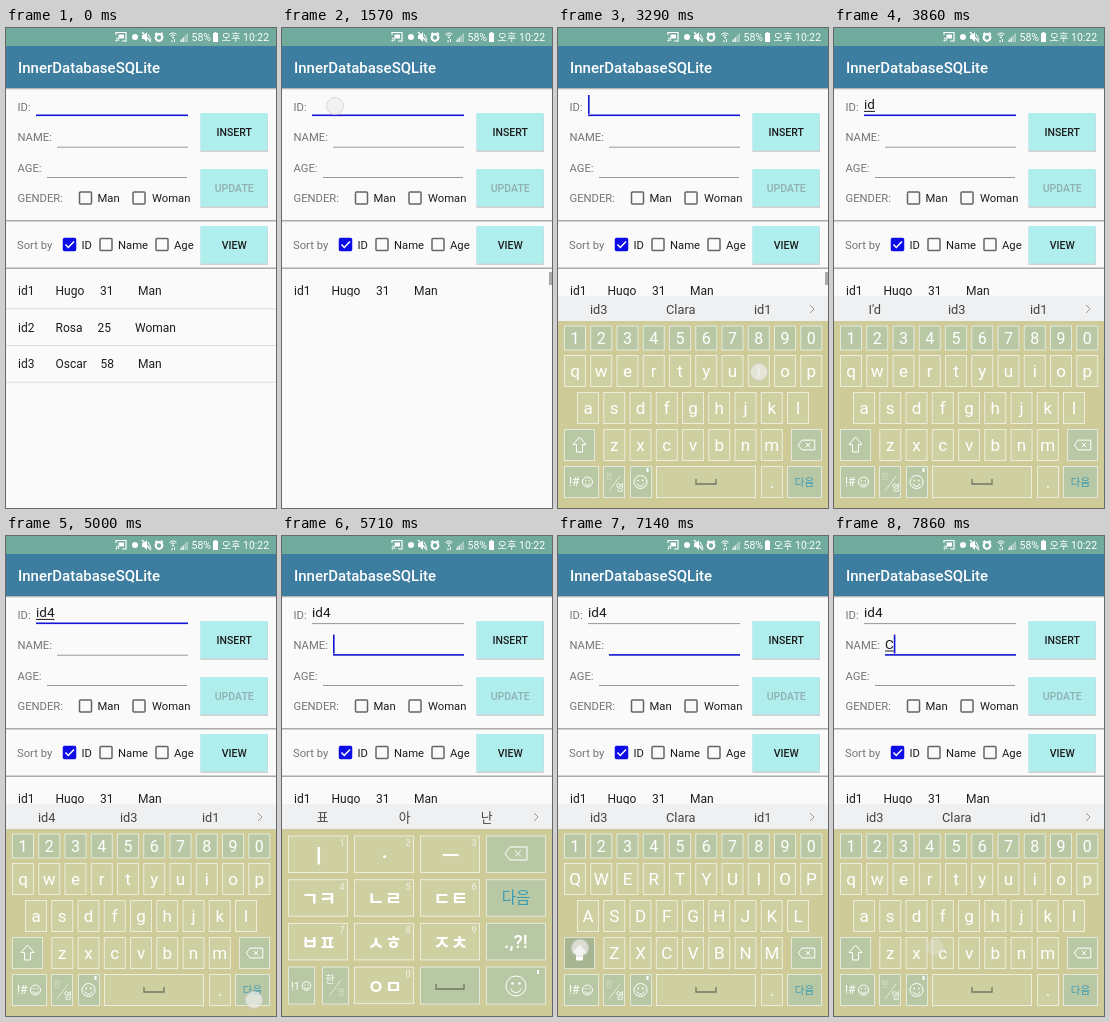
An HTML page with a canvas for the animation above (8000 ms loop, 270 px wide and 480 px high).

```html
<!DOCTYPE html>
<html lang="en">
<head>
<meta charset="utf-8">
<title>InnerDatabaseSQLite</title>
<style>
  html, body { margin: 0; width: 100%; height: 100%; overflow: hidden; background: #fafafa; }
  canvas { display: block; width: 270px; height: 480px; }
</style>
</head>
<body>
<canvas id="stage"></canvas>
<script>
const canvas = document.getElementById('stage');
const ctx = canvas.getContext('2d');
const dpr = window.devicePixelRatio || 1;
canvas.width = 270 * dpr;
canvas.height = 480 * dpr;

const LOOP = 8000, FPS = 7;
const BLUE = '#1414d2', WHITE = '#fff', GREY = '#757575', BLACK = '#1c1c1c';
const KEYBOARD = '#cecb98', PLAIN = '#cfd0a2', TINT = '#b9c8a4', NEXT = '#3b9bb5';

const PEOPLE = [
  ['Hugo', '31', 94, 'Man', 132],
  ['Rosa', '25', 91.5, 'Woman', 129],
  ['Oscar', '58', 94.5, 'Man', 132]
];

// Spans are in ticks of 1/7 s: [start, end)
const CURSOR_ON = [[3, 10], [14, 19], [23, 27], [29, 35], [37, 41], [44, 48], [52, 56]];
const TOUCHES = [
  [6, 13, 53, 78], [16, 19, 48, 462], [23, 25, 201, 344], [26, 27, 83, 381],
  [30, 33, 97, 311], [35, 39, 248, 464], [45, 48, 48, 462], [50, 52, 22, 412], [53, 56, 101, 411]
];
const within = (tick, [start, end]) => tick >= start && tick < end;

// Picks the value of the last step that has begun
const pick = (tick, steps) => steps.filter(([start]) => tick >= start).pop()[1];

function text(str, x, y, size, color, align = 'left', weight = 400) {
  ctx.font = `${weight} ${size}px Roboto, "Noto Sans CJK KR", sans-serif`;
  ctx.textAlign = align;
  ctx.fillStyle = color;
  ctx.fillText(str, x, y);
}

function box(x, y, w, h, color) {
  ctx.fillStyle = color;
  ctx.fillRect(x, y, w, h);
}

function line(points, color = WHITE, width = 1, close = false) {
  ctx.beginPath();
  points.forEach(([x, y]) => ctx.lineTo(x, y));
  if (close) ctx.closePath();
  ctx.strokeStyle = color;
  ctx.lineWidth = width;
  ctx.stroke();
}

function shape(points, color = WHITE) {
  ctx.beginPath();
  points.forEach(([x, y]) => ctx.lineTo(x, y));
  ctx.fillStyle = color;
  ctx.fill();
}

function arc(x, y, r, from = 0, to = 2 * Math.PI, width = 1, color = WHITE) {
  ctx.beginPath();
  ctx.arc(x, y, r, from, to);
  ctx.strokeStyle = color;
  ctx.lineWidth = width;
  ctx.stroke();
}

function dot(x, y, r, color = WHITE) {
  ctx.beginPath();
  ctx.arc(x, y, r, 0, 2 * Math.PI);
  ctx.fillStyle = color;
  ctx.fill();
}

function statusBar() {
  box(0, 0, 270, 18, '#70ab9e');
  line([[110, 7], [110, 4.5], [120, 4.5], [120, 13], [116, 13]], WHITE, 1.2);
  box(112.5, 6.5, 5.5, 4, WHITE);
  arc(110, 13, 3, -Math.PI / 2, 0);
  dot(110.5, 12.5, 1);
  dot(129, 9, 3);
  shape([[136, 7], [138, 7], [141, 4], [141, 14], [138, 11], [136, 11]]);
  line([[136, 4], [145, 14]], WHITE, 1.2);
  line([[142, 6], [145, 12]]);
  arc(153, 9.5, 3.3, 0, 2 * Math.PI, 2.2);
  line([[149, 6.5], [151, 4.5]], WHITE, 1.3);
  line([[155, 4.5], [157, 6.5]], WHITE, 1.3);
  [5, 3].forEach(r => arc(167, 10, r, -2.4, -0.74));
  dot(167, 9.5, 1);
  line([[166, 12], [166, 14.5]]);
  line([[168.5, 11], [168.5, 14]]);
  [0, 1, 2, 3].forEach(i => box(174.5 + i * 2, 11.5 - i * 2, 1.3, 2.5 + i * 2, i < 2 ? WHITE : '#ffffff88'));
  text('58%', 185.5, 13, 10.5, WHITE);
  box(207, 5, 5, 9, WHITE);
  box(208.5, 4, 2, 1, WHITE);
  text('오후 10:22', 263, 13, 10.4, WHITE, 'right');
}

function button(label, y, enabled = true) {
  box(194.5, y + 1, 67.5, 38, '#0000002a');
  box(194.5, y, 67, 37.5, '#afeeec');
  text(label, 228.2, y + 22.9, 10.5, enabled ? BLACK : '#8fb0b0', 'center', 500);
}

function checkbox(label, x, y, labelX, checked) {
  ctx.beginPath();
  ctx.roundRect(x - 6, y - 6, 12, 12, 1);
  ctx.lineWidth = 1.5;
  ctx.strokeStyle = checked ? '#0c0ce6' : '#666';
  if (checked) {
    ctx.fillStyle = '#0c0ce6';
    ctx.fill();
  }
  ctx.stroke();
  if (checked) line([[x - 4, y], [x - 1.2, y + 3], [x + 4.5, y - 3]], WHITE, 1.5);
  text(label, labelX, y + 4.2, 11.25, BLACK);
}

function field(label, labelY, value, x, right, y, focused, cursor) {
  text(label, 11.5, labelY, 11.25, GREY);
  box(x, y - (focused ? 0.9 : 0.3), right - x, focused ? 1.6 : 1, focused ? BLUE : '#999');
  text(value, x, y - 6, 13.5, BLACK);
  const end = x + ctx.measureText(value).width;
  if (focused && value) box(x, y - 4.5, end - x, 1, BLACK);
  if (focused && cursor) box(end, y - 20.4, 1.6, 19, BLUE);
}

function form(tick) {
  const cursor = CURSOR_ON.some(span => within(tick, span));
  const onName = tick >= 37;
  const id = pick(tick, [[0, ''], [24, 'i'], [27, 'id'], [32, 'id4']]);
  box(0, 60, 270, 1, '#00000044');
  box(0, 61, 270, 1, '#00000018');
  box(0, 18, 270, 42, '#3d7d9f');
  text('InnerDatabaseSQLite', 12, 44.5, 15, WHITE, 'left', 500);
  field('ID:', 83, id, 30, 182, 87.4, !onName, cursor);
  field('NAME:', 113.3, tick >= 54 ? 'C' : '', 51, 182, 119, onName, cursor);
  field('AGE:', 144, '', 41, 181, 149.3, false, false);
  text('GENDER:', 11.5, 174, 11.25, GREY);
  checkbox('Man', 79.5, 170, 91.5);
  checkbox('Woman', 133, 170, 146);
  text('Sort by', 11, 220.5, 11.25, GREY);
  checkbox('ID', 63.5, 216.5, 75.5, true);
  checkbox('Name', 100, 216.5, 112);
  checkbox('Age', 156, 216.5, 168);
  button('INSERT', 85);
  button('UPDATE', 141, false);
  button('VIEW', 198);
  box(0, 192, 270, 1.5, '#aaa');
  box(0, 239.5, 270, 1.5, '#aaa');
}

function list(shrunk) {
  ctx.save();
  ctx.beginPath();
  ctx.rect(0, 241, 270, shrunk ? 27.5 : 239);
  ctx.clip();
  PEOPLE.forEach(([name, age, ageX, gender, genderX], i) => {
    const y = 267 + i * 36.7;
    text('id' + (i + 1), 12, y, 12, BLACK);
    text(name, 49.5, y, 12, BLACK);
    text(age, ageX, y, 12, BLACK);
    text(gender, genderX, y, 12, BLACK);
    box(0, y + 13.3, 270, 1, '#dcdcdc');
  });
  ctx.restore();
}

function key(x, y, w, h, fill, label, size, color = WHITE, weight = 400) {
  box(x, y, w, h, fill);
  ctx.strokeStyle = '#ffffff99';
  ctx.lineWidth = 1;
  ctx.strokeRect(x + 0.5, y + 0.5, w - 1, h - 1);
  if (label) text(label, x + w / 2, y + h / 2 + size * 0.35, size, color, 'center', weight);
}

// Key with large Korean letters and a small digit in its corner
function jamoKey(x, y, letters, digit) {
  key(x, y, 60, 37.5, PLAIN);
  text(letters, x + 30.7, y + 27, 19, WHITE, 'center', 600);
  text(digit, x + 54, y + 10.5, 9, '#ffffffbb', 'center');
}

function smile(x, y, r) {
  arc(x, y, r);
  arc(x, y + r * 0.1, r * 0.55, 0.3, 2.84);
  dot(x - r * 0.35, y - r * 0.25, r * 0.13);
  dot(x + r * 0.35, y - r * 0.25, r * 0.13);
}

function backspace(x, y, s) {
  const at = points => points.map(([px, py]) => [x + px * s, y + py * s]);
  line(at([[-11, 0], [-6, -6.5], [11, -6.5], [11, 6.5], [-6, 6.5]]), WHITE, 1, true);
  line(at([[-1, -3], [5, 3]]));
  line(at([[5, -3], [-1, 3]]));
}

function spaceMark(x, y, w) {
  line([[x - w, y - 3], [x - w, y + 2], [x + w, y + 2], [x + w, y - 3]], '#6f7763', 1.3);
}

function languageMark(x, y, korean) {
  text('한', x - 5, y - 3, korean ? 10 : 8, korean ? WHITE : '#ffffff77', 'center');
  line([[x - 5, y + 9], [x + 6, y - 6]], '#ffffffbb', 0.8);
  text('영', x + 6, y + 9, korean ? 8 : 9, korean ? '#ffffff77' : WHITE, 'center');
}

function koreanKeys(pressed) {
  const rows = [['ㅣ', '·', 'ㅡ'], ['ㄱㅋ', 'ㄴㄹ', 'ㄷㅌ'], ['ㅂㅍ', 'ㅅㅎ', 'ㅈㅊ']];
  const columnX = c => 6 + c * 66, rowY = r => 299.5 + r * 43.7;
  rows.forEach((row, r) => row.forEach((letters, c) =>
    jamoKey(columnX(c), rowY(r), letters, r * 3 + c + 1)));
  const last = rowY(3);
  key(204, rowY(0), 60, 37.5, TINT);
  backspace(234, 317.5, 1);
  key(204, rowY(1), 60, 37.5, TINT, '다음', 15.5, NEXT, 500);
  key(204, rowY(2), 60, 37.5, TINT, '.,?!', 19, WHITE, 500);
  key(6, last, 27, 38, TINT);
  text('!1', 9, 454, 11, WHITE);
  smile(24.5, 450, 4.3);
  key(40, last, 27, 38, pressed ? '#948b5f' : TINT);
  languageMark(53, 450, true);
  jamoKey(72, last, 'ㅇㅁ', 0);
  key(138, last, 60, 38, TINT);
  spaceMark(168, 451, 14);
  key(204, last, 60, 38, TINT);
  smile(234, 450, 10);
  box(255, 434, 2, 4, WHITE);
}

function englishKeys(caps) {
  const row = (letters, x, y, h, fill, size) => [...letters].forEach((letter, i) =>
    key(x + i * 26.25, y, 22, h, fill, caps ? letter.toUpperCase() : letter, size));
  row('1234567890', 6, 297.5, 25, TINT, 16);
  row('qwertyuiop', 6, 327, 32, PLAIN, 17);
  row('asdfghjkl', 19, 364, 32, PLAIN, 17);
  row('zxcvbnm', 45.3, 401, 32, PLAIN, 17);
  key(6, 401, 31, 32, caps ? '#a8b592' : TINT);
  const arrow = [[21.5, 409], [28, 416.5], [24.5, 416.5], [24.5, 424], [18.5, 424], [18.5, 416.5], [15, 416.5]];
  if (caps) shape(arrow);
  line(arrow, WHITE, 1, true);
  key(233, 401, 31, 32, TINT);
  backspace(248.5, 417, 0.75);
  key(6, 438, 35, 32, TINT);
  text('!#', 11, 458, 12, WHITE);
  smile(29.5, 454, 5);
  key(45, 438, 22, 32, TINT);
  languageMark(56, 454, false);
  key(72, 438, 22, 32, TINT);
  smile(82.5, 454, 6.5);
  box(88.5, 440, 2, 4, WHITE);
  key(98, 438, 100, 32, PLAIN);
  spaceMark(148, 454, 10);
  key(203, 438, 22, 32, PLAIN, '.', 17);
  key(229, 438, 35, 32, TINT, '다음', 10.5, NEXT, 500);
}

function keyboard(tick) {
  const korean = tick < 18 || within(tick, [39, 47]);
  const words = korean ? ['표', '아', '난'] : pick(tick, [
    [0, ['id3', 'Clara', 'id1']], [24, ["I'm", 'id3', 'is']], [27, ["I'd", 'id3', 'id1']],
    [32, ['id4', 'id3', 'id1']], [47, ['id3', 'Clara', 'id1']]
  ]);
  ctx.save();
  ctx.translate(0, pick(tick, [[12, 110], [13, 24], [14, 0]]));
  box(0, 268, 270, 25, '#eff0f1');
  words.forEach((word, i) => text(word, 40.7 + i * 82, 285.5, 12.8, '#444', 'center'));
  line([[252, 277], [256, 281], [252, 285]], '#999');
  box(0, 293, 270, 187, KEYBOARD);
  if (korean) koreanKeys(within(tick, [16, 18]) || within(tick, [45, 47]));
  else englishKeys(within(tick, [50, 54]));
  ctx.restore();
}

function touches(tick) {
  TOUCHES.filter(span => within(tick, span)).forEach(([, end, x, y]) => {
    ctx.globalAlpha = tick === end - 1 ? 0.25 : 0.7;
    dot(x, y, 8.5, '#eee');
    arc(x, y, 8.5, 0, 2 * Math.PI, 1, '#ccc');
    ctx.globalAlpha = 1;
  });
}

function draw(now) {
  // The 5 ms lead rounds each tick to the nearest hundredth of a second
  const tick = Math.floor(((now % LOOP) + 5) * FPS / 1000) % (LOOP * FPS / 1000);
  ctx.setTransform(dpr, 0, 0, dpr, 0, 0);
  box(0, 0, 270, 480, '#fafafa');
  statusBar();
  form(tick);
  list(tick >= 11);
  if (within(tick, [11, 24])) box(267, 244, 3, 13, '#aaa');
  if (tick >= 12) keyboard(tick);
  touches(tick);
}

let start;
function frame(now) {
  start ??= now;
  draw(now - start);
  requestAnimationFrame(frame);
}
requestAnimationFrame(frame);
</script>
</body>
</html>
```
